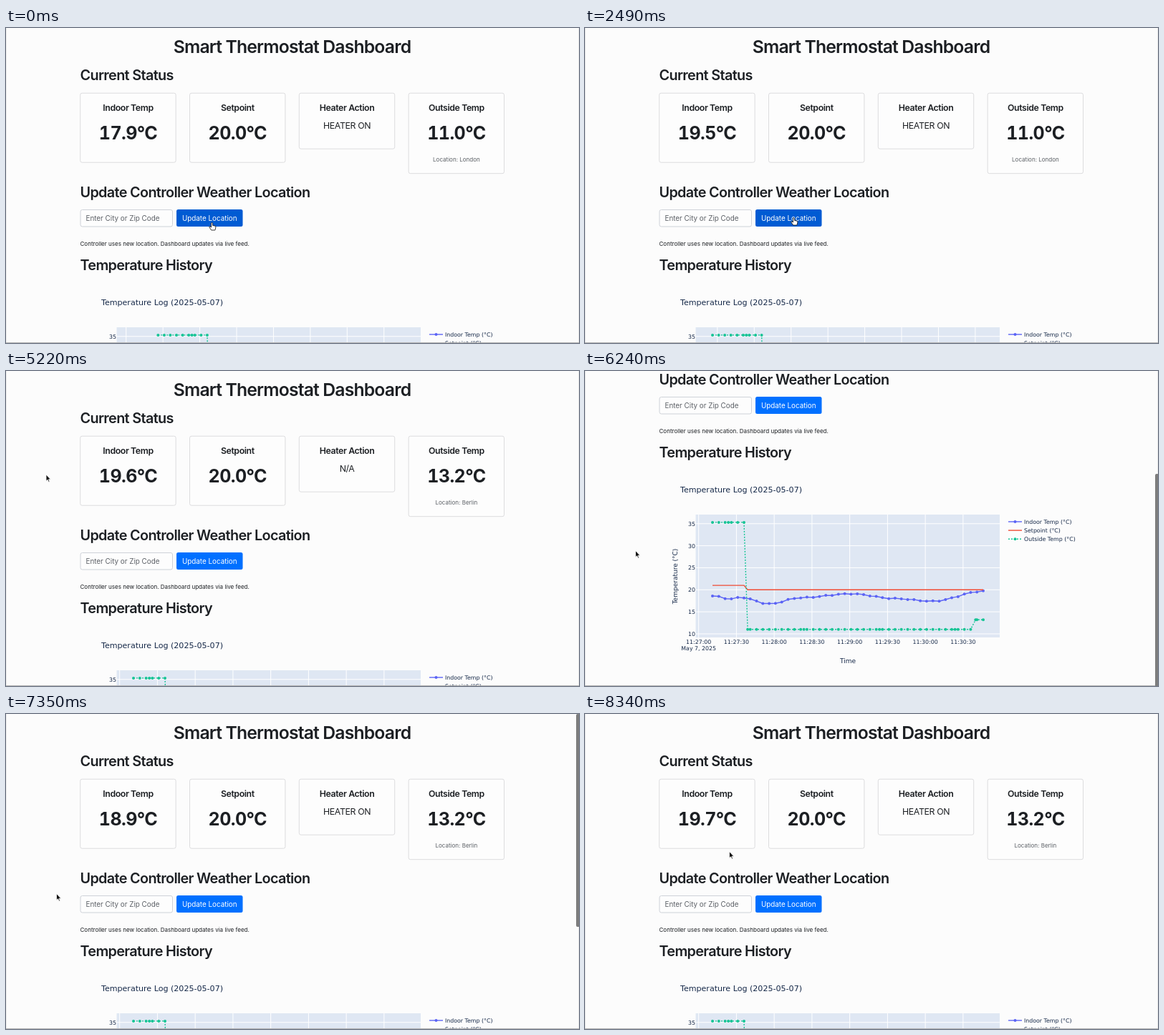
These frames come from a looping animation (800 px wide and 441 px high, 8370 ms). An HTML page:

```html
<!DOCTYPE html>
<html lang="en">
<head>
<meta charset="utf-8">
<title>Smart Thermostat Dashboard</title>
<style>
html, body { margin: 0; width: 800px; height: 441px; overflow: hidden; background: #fcfcfc; }
svg { display: block; font-family: Inter, Roboto, sans-serif; font-optical-sizing: none; fill: #1c1f23; }
.mid { text-anchor: middle; }
.end { text-anchor: end; }
.h1 { font-size: 24.7px; font-weight: 600; letter-spacing: -.033em; }
.h2 { font-size: 19.8px; font-weight: 600; letter-spacing: -.0325em; }
.h5 { font-size: 12.3px; font-weight: 600; letter-spacing: -.032em; }
.action { font-size: 12.3px; letter-spacing: -.027em; }
.big { font-size: 25px; font-weight: 700; letter-spacing: -.022em; font-variant-numeric: tabular-nums; }
.field { font-size: 9.85px; }
.small { font-size: 8.02px; }
.muted { fill: #5c6066; }
.box { fill: #fdfdfd; stroke: #dcdcde; }
.plot { font-family: "DejaVu Sans", Verdana, sans-serif; font-size: 7.85px; fill: #152848; }
.log { font-size: 11.08px; }
.axis { font-size: 9px; }
.grid { stroke: #fff; stroke-width: 1; }
.line { fill: none; stroke-width: 1.4; stroke-linejoin: round; }
</style>
</head>
<body>
<svg width="800" height="441" viewBox="0 0 800 441">
  <defs><clipPath id="area"><rect x="154.5" y="419" width="424.5" height="172"/></clipPath></defs>
  <rect width="800" height="441" fill="#fcfcfc"/>
  <g id="page">
    <text class="h1 mid" x="399.5" y="35">Smart Thermostat Dashboard</text>
    <text class="h2" x="103.5" y="73">Current Status</text>
    <g id="cards"></g>
    <text class="h2" x="103.5" y="236.5">Update Controller Weather Location</text>
    <rect id="ring" x="102" y="252.5" width="132.5" height="27" rx="4" fill="#bfdeff"/>
    <rect id="input" class="box" x="104" y="254.5" width="128.5" height="23.5" rx="2.5"/>
    <text id="typed" class="field" x="111.5" y="269.8"></text>
    <rect id="button" x="238" y="254" width="92.5" height="24" rx="2.5"/>
    <text class="field mid" x="284.2" y="269.8" fill="#fff">Update Location</text>
    <text class="small" x="103.5" y="304.7">Controller uses new location. Dashboard updates via live feed.</text>
    <text class="h2" x="103.5" y="338.5">Temperature History</text>
    <g id="chart" class="plot"></g>
  </g>
  <path d="M.5 0V441M799.5 0V441" stroke="#ececec"/>
  <path d="M0 440.5H800" stroke="#b4b4b4"/>
  <rect id="thumb" x="796" width="5" height="298" rx="2" fill="#7d7d7d"/>
  <g id="pointer" stroke-linejoin="round">
    <path id="arrow" d="M0 0V9.2L2.1 7.3L3.6 10.6L5 10L3.6 6.8H6.3Z" fill="#111" stroke="#fff" stroke-width=".8"/>
    <path id="hand" d="M-1 0Q0-1 1 0V3.4L4.6 4.2Q5.6 4.6 5.4 6L4.4 10H-.8L-3.6 6Q-4 4.6-2.6 4.8L-1 6Z" fill="#fff" stroke="#222" stroke-width=".9"/>
    <path id="beam" d="M-1.5-5H1.5M0-5V5M-1.5 5H1.5" fill="none" stroke="#333" stroke-width=".9"/>
  </g>
</svg>
<script>
const LOOP = 8370, MAX_SCROLL = 218, SWITCH = 3000;
const $ = id => document.getElementById(id);
const BLUE = '#5b63f5', RED = '#f04b35', GREEN = '#16c495';

// Eased progress from 0 to 1 between two times
function glide(t, from, to) {
  const p = Math.min(1, Math.max(0, (t - from) / (to - from)));
  return p * p * (3 - 2 * p);
}

// Smooth curve through a few [position, value] points
const curve = (points, x) => points.reduce((v, [px, pv], i) =>
  i ? v + (pv - points[i - 1][1]) * glide(x, points[i - 1][0], px) : pv, 0);

const scrollAt = t => MAX_SCROLL *
  (glide(t, 5920, 6220) - glide(t, 6950, 7320) + glide(t, 7430, 7750) - glide(t, 7830, 8130));

// Pointer moves: start, end, destination
const moves = [[120, 480, 170, 267], [1800, 2200, 291.5, 266], [3500, 4700, 56, 145],
               [5230, 5860, 31, 195], [5930, 6200, 70.5, 251.5], [7780, 8250, 201.5, 192.5]];
const pointerAt = t => moves.reduce(([x, y], [from, to, nx, ny]) => {
  const p = glide(t, from, to);
  return [x + (nx - x) * p, y + (ny - y) * p];
}, [287.5, 273]);

// Readings arrive every half second
const readingAt = t => curve([[0, 17.9], [2000, 19.5], [3000, 19.6], [5500, 19.6], [7000, 18.9], [8000, 19.7]],
  Math.floor(t / 500) * 500);

// Chart data, in seconds from 11:27:00: regular samples, one extra a minute and one at each location change
const times = [38.9, 219.9];
for (let s = -4; s <= 226; s += 5) times.push(s);
for (let s = 23.6; s < 226; s += 60) times.push(s);
times.sort((a, b) => a - b);
const outdoor = times.map(s => [s, s < 37 ? 35.3 : s < 218 ? 11 : 13.2]);
const setpoint = times.map(s => [s, s < 37 ? 21 : 20]);
const drift = [[11, 18.6], [26, 17.9], [33, 18.3], [56, 16.8], [81, 18.2], [121, 19.1], [156, 18], [186, 17.4], [226, 19.7]];
const indoor = times.filter(s => (s + 4) % 5 === 0).map(s => [s, curve(drift, s) + .1 * Math.sin(s * 1.7)]);

const text = (x, y, str, cls = '', extra = '') => `<text class="${cls}" x="${x}" y="${y}" ${extra}>${str}</text>`;
const dot = (x, y, color) => `<circle cx="${x}" cy="${y}" r="2" fill="${color}"/>`;

function drawCards(temp, act, out, city) {
  const cards = [['Indoor Temp', 97, temp], ['Setpoint', 97, '20.0'], ['Heater Action', 78], ['Outside Temp', 112.5, out]];
  $('cards').innerHTML = cards.map(([name, h, value], i) => {
    const x = 104 + i * 152.8, mid = x + 66.5;
    return `<rect class="box" x="${x - .3}" y="91.2" width="133.4" height="${h}" rx="2.5"/>`
      + text(mid, 116.3, name, 'h5 mid')
      + (value ? text(mid, 156, value + '°C', 'big mid') : text(mid, 141.3, act, 'action mid'));
  }).join('') + text(628.9, 187, 'Location: ' + city, 'small mid muted');
}

function drawChart(start, end) {
  const X = s => 178 + (s - start) * 378 / (end - start);
  const Y = v => 586 - (v - 10) * 6.17;
  const trace = (data, color, dash, marks) => {
    const pts = data.filter(p => p[0] >= start && p[0] <= end).map(([s, v]) => [X(s).toFixed(1), Y(v).toFixed(1)]);
    return `<polyline class="line" points="${pts.join(' ')}" stroke="${color}" stroke-dasharray="${dash}"/>`
      + (marks ? pts.map(p => dot(...p, color)).join('') : '');
  };
  let grid = '', labels = '', date = 'May 7, 2025';
  for (let s = -30; s <= 240; s += 30) {
    const x = X(s);
    if (x < 155 || x > 577) continue;
    grid += `<path class="grid" d="M${x} 419V591"/>`;
    labels += text(x, 599.8, `11:${27 + Math.floor(s / 60)}:${s % 60 ? '30' : '00'}`, 'mid') + text(x, 609, date, 'mid');
    date = '';
  }
  for (let v = 10; v <= 35; v += 5) {
    grid += `<path class="grid" d="M154.5 ${Y(v)}H579"/>`;
    labels += text(154, Y(v) + 3, v, 'end');
  }
  const legend = [['Indoor Temp', BLUE, 'none', 1], ['Setpoint', RED, 'none', 0], ['Outside Temp', GREEN, '2 2', 1]]
    .map(([name, color, dash, mark], i) => {
      const y = 429 + i * 12.1;
      return `<path class="line" d="M591 ${y}H610" stroke="${color}" stroke-dasharray="${dash}"/>`
        + (mark ? dot(600.5, y, color) : '') + text(613, y + 2.6, name + ' (°C)');
    }).join('');
  $('chart').innerHTML = text(133, 387.6, 'Temperature Log (2025-05-07)', 'log')
    + `<rect x="154.5" y="419" width="424.5" height="172" fill="#dfe7f3"/><g clip-path="url(#area)">${grid}`
    + trace(indoor, BLUE, 'none', true) + trace(setpoint, RED, 'none', false)
    + trace(outdoor, GREEN, '2 2', true) + '</g>' + labels + legend
    + text(367, 627, 'Time', 'axis mid')
    + text(0, 0, 'Temperature (°C)', 'axis mid', 'transform="translate(129 505.5) rotate(-90)"');
}

const show = (id, on) => $(id).setAttribute('visibility', on ? 'visible' : 'hidden');
let cardKey, chartKey;

function render(t) {
  const moved = t >= SWITCH;
  const data = [readingAt(t).toFixed(1), moved && t < 6500 ? 'N/A' : 'HEATER ON',
                ...(moved ? ['13.2', 'Berlin'] : ['11.0', 'London'])];
  if (cardKey !== (cardKey = data.join())) drawCards(...data);

  const end = moved ? 226 : 196.5 + 5 * Math.min(4, Math.floor(t / 500));
  if (chartKey !== (chartKey = end)) drawChart(moved ? 11 : end - 220.5, end);

  const focus = t >= 500 && t < 2300;
  show('ring', focus);
  $('input').style.stroke = focus ? '#80bdff' : '#ced2d8';
  const word = t < 2400 ? 'Berlin'.slice(0, Math.max(0, Math.floor((t - 750) / 130))) : '';
  $('typed').textContent = word || 'Enter City or Zip Code';
  $('typed').style.fill = word ? '#495057' : '#5c6066';

  const [x, y] = pointerAt(t), top = scrollAt(t);
  const inRow = y + top > 254 && y + top < 278;
  const hover = inRow && x > 238 && x < 330, overInput = inRow && x > 104 && x < 232;
  $('button').style.fill = hover ? '#005bd3' : '#0070ff';
  show('hand', hover);
  show('beam', overInput);
  show('arrow', !hover && !overInput);
  $('pointer').setAttribute('transform', `translate(${x} ${y})`);
  $('page').setAttribute('transform', `translate(0 ${-top})`);
  $('thumb').setAttribute('y', top / MAX_SCROLL * 144);
  $('thumb').setAttribute('opacity', glide(t, 5910, 5960) - glide(t, 8150, 8310));
}

const began = performance.now();
function tick() {
  render((performance.now() - began) % LOOP);
  requestAnimationFrame(tick);
}
tick();
</script>
</body>
</html>
```
